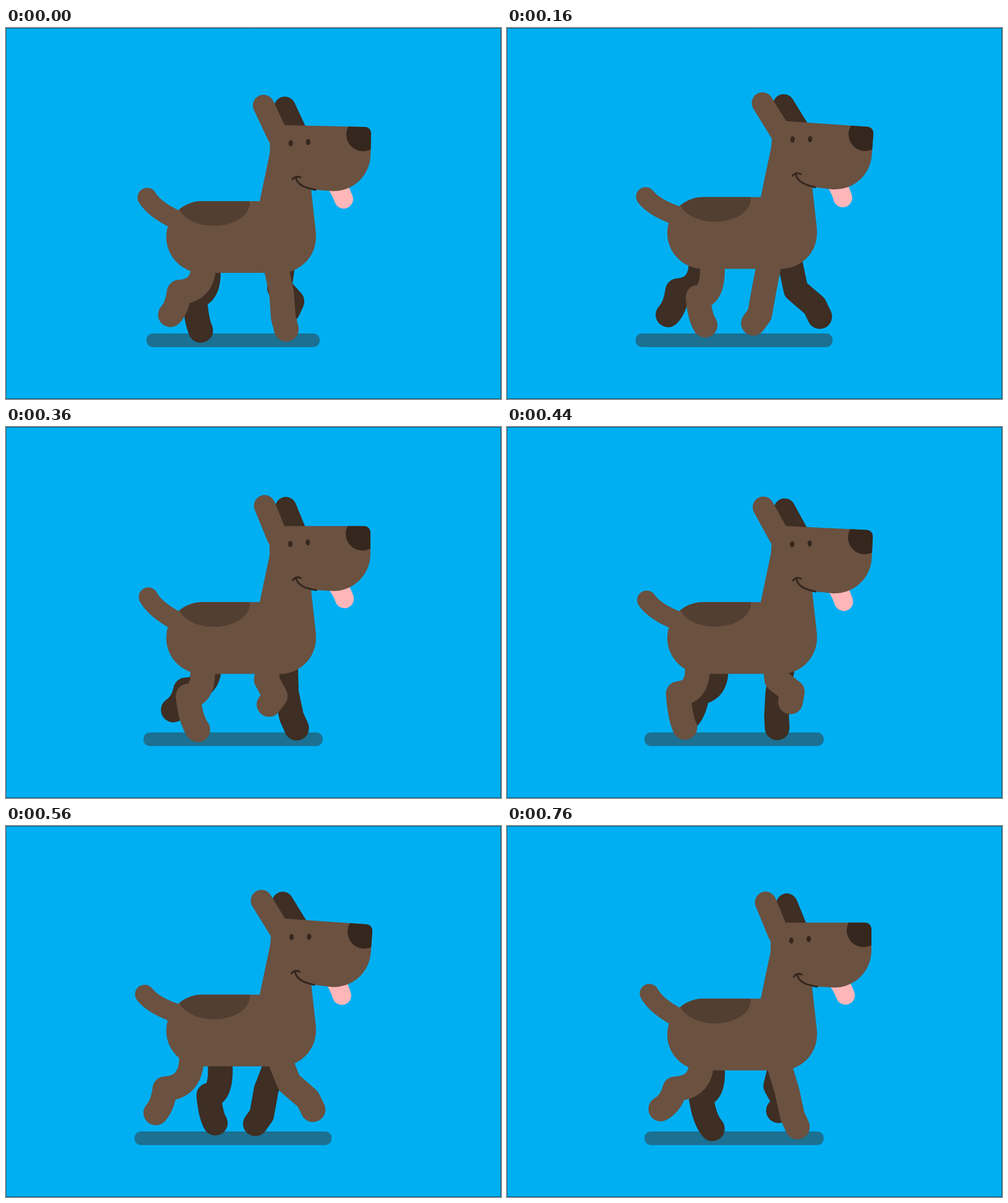
These frames come from a looping animation (800 px wide and 600 px high, 0.8 s). An HTML page with a canvas:

```html
<!DOCTYPE html>
<html lang="en">
<head>
<meta charset="utf-8">
<title>Walking dog</title>
<style>
  html, body { margin: 0; width: 100%; height: 100%; overflow: hidden; background: #00aff2; }
  canvas { display: block; width: 100vw; height: 100vh; }
</style>
</head>
<body>
<canvas id="stage" width="800" height="600"></canvas>
<script>
const ctx = document.getElementById('stage').getContext('2d');
const LOOP = 800, STEP = 40, TAU = Math.PI * 2, DEG = Math.PI / 180;
const SKY = '#00aff2', EDGE = '#07597b', SHADOW = '#1c7091';
const FUR = '#6b5140', PATCH = '#533f32', FAR = '#3e2e24', INK = '#35271e', TONGUE = '#ffb6b9';

// Cosine that peaks at the given time
const swing = (t, peak, period = LOOP) => Math.cos(TAU * (t - peak) / period);

function fill(color, draw) {
  ctx.fillStyle = color;
  ctx.beginPath();
  draw();
  ctx.fill();
}

function limb(color, width, draw) {
  ctx.strokeStyle = color;
  ctx.lineWidth = width;
  ctx.lineCap = ctx.lineJoin = 'round';
  ctx.beginPath();
  draw();
  ctx.stroke();
}

function clipped(shape, draw) {
  ctx.save();
  ctx.beginPath();
  shape();
  ctx.clip();
  draw();
  ctx.restore();
}

function turned(x, y, degrees, draw) {
  ctx.save();
  ctx.translate(x, y);
  ctx.rotate(degrees * DEG);
  ctx.translate(-x, -y);
  draw();
  ctx.restore();
}

// The body bobs twice per loop, with uneven steps
function bodyTop(t) {
  const keys = [280.1, 272.8, 284.4, 271.6];
  const i = Math.floor(t / 200), u = (t % 200) / 200;
  const a = keys[i], b = keys[(i + 1) % 4];
  return a + (b - a) * (1 - Math.cos(Math.PI * u)) / 2;
}

// Far legs run half a loop behind the near ones
function frontLeg(top, t, far) {
  if (far) t += LOOP / 2;
  const lift = far ? (1 - swing(t, 0)) / 2 : 0;
  const dx = 14 * lift, dy = 12 * lift, snap = swing(t, 655, LOOP / 2);
  limb(far ? FAR : FUR, 40, () => {
    ctx.moveTo(far ? 451 : 430, top + 75);
    ctx.lineTo(436.7 + 26.4 * swing(t, 643) + dx, 418.9 + 10.9 * swing(t, 0) + dy);
    ctx.lineTo(448.2 + 41.8 * swing(t, 600) + dx, 452 + 19.8 * swing(t, 33) + 4 * snap + dy);
    ctx.lineTo(447.2 + 53.8 * swing(t, 614) + dx, 467.9 + 21.2 * swing(t, 18) + 2.6 * snap + dy);
  });
}

function backLeg(top, t, far) {
  if (far) t += LOOP / 2;
  const hip = 315.8 + 16.1 * swing(t, 174) + (far ? 14 : 0);
  const hockX = 282.8 + 28.4 * swing(t, 213) + (far ? 19 : 0);
  const hockY = 430.2 + 7.2 * swing(t, 256);
  const kick = 6 * swing(t, 270, LOOP / 2);
  const pawX = 280.2 + 49.7 * swing(t, 245) + (far ? 20 + kick : -kick);
  const pawY = 472.9 + 18 * swing(t, 299) + 5 * swing(t, 51, LOOP / 2);
  limb(far ? FAR : FUR, 40, () => {
    ctx.moveTo(hip, top + 90);
    ctx.lineTo(hip, top + 107);
    ctx.quadraticCurveTo(hip + 9 - .27 * (hip - hockX), hockY - 2, hockX, hockY);
    ctx.quadraticCurveTo(hockX + (pawX - hockX) * .25, hockY + (pawY - hockY) * .7, pawX, pawY);
  });
}

function drawBody() {
  fill(FUR, () => {
    ctx.moveTo(317, 0);
    ctx.lineTo(410, 0);
    ctx.lineTo(428.5, -88);
    ctx.lineTo(480, -88);
    ctx.lineTo(493, -20);
    ctx.lineTo(500.5, 48);
    ctx.quadraticCurveTo(501, 52, 501, 58);
    ctx.arc(443, 58, 58, 0, Math.PI / 2);
    ctx.arc(317, 58, 58, Math.PI / 2, Math.PI * 1.5);
  });
  clipped(() => ctx.roundRect(259, 0, 242, 116, 58),
    () => fill(PATCH, () => ctx.ellipse(336, 3, 58, 37, 0, 0, TAU)));
}

function drawTail(sway) {
  turned(275, 32, -sway, () => limb(FUR, 31, () => {
    ctx.moveTo(230, -8.5);
    ctx.quadraticCurveTo(241, 12, 277, 31);
  }));
}

function ear(color, dx, dy, tilt, sway) {
  const x = 438.8 + tilt * DEG * 41 + dx, y = -105 - tilt * DEG * 5 + dy;
  const angle = (22.3 + sway) * DEG;
  limb(color, 34.6, () => {
    ctx.moveTo(x, y);
    ctx.lineTo(x - 55 * Math.sin(angle), y - 55 * Math.cos(angle));
  });
}

function headShape() {
  ctx.moveTo(435, -123);
  ctx.lineTo(579, -123);
  ctx.arcTo(589, -123, 589, -113, 10);
  ctx.arc(529, -78, 60, 0, Math.PI / 2);
  ctx.lineTo(493, -20);
  ctx.lineTo(470, -24);
  ctx.lineTo(426, -66);
  ctx.lineTo(426, -100);
  ctx.closePath();
}

function drawHead(tilt, sway) {
  ear(FAR, 34.3, 3, tilt, sway);
  turned(449, -64, tilt, () => {
    limb(TONGUE, 30.5, () => {
      ctx.moveTo(529, -36);
      ctx.quadraticCurveTo(541, -22, 547, -5.5);
    });
    fill(FUR, headShape);
    clipped(headShape, () => fill(INK, () => ctx.arc(576, -110.5, 27, 0, TAU)));
    fill(INK, () => ctx.ellipse(459.5, -94, 3.5, 5, 0, 0, TAU));
    fill(INK, () => ctx.ellipse(487.7, -96.5, 3.5, 5, 0, 0, TAU));
    limb(INK, 3, () => {
      ctx.moveTo(463.5, -35.5);
      ctx.quadraticCurveTo(469, -42.5, 476.5, -39);
      ctx.moveTo(469, -39);
      ctx.bezierCurveTo(471, -26, 486, -22, 501, -19.5);
    });
  });
  ear(FUR, 0, 0, tilt, sway);
}

function draw(t) {
  const top = bodyTop(t);
  const shadow = 164 - 24 * Math.abs(1 - (t % 400) / 200);
  const tilt = 2 + 2.47 * swing(t, 120, LOOP / 2);
  const sway = tilt * 2.33;

  ctx.fillStyle = SKY;
  ctx.fillRect(0, 0, 800, 600);
  fill(SHADOW, () => ctx.roundRect(367 - shadow, 494, shadow * 2, 22, 10));

  backLeg(top, t, true);
  frontLeg(top, t, true);

  ctx.save();
  ctx.translate(0, top);
  drawTail(sway);
  drawBody();
  drawHead(tilt, sway);
  ctx.restore();

  backLeg(top, t, false);
  frontLeg(top, t, false);

  ctx.strokeStyle = EDGE;
  ctx.lineWidth = 1;
  ctx.strokeRect(.5, .5, 799, 599);
}

const start = performance.now();
function tick() {
  const t = (performance.now() - start) % LOOP;
  draw(Math.floor(t / STEP) * STEP);
  requestAnimationFrame(tick);
}
tick();
</script>
</body>
</html>
```
